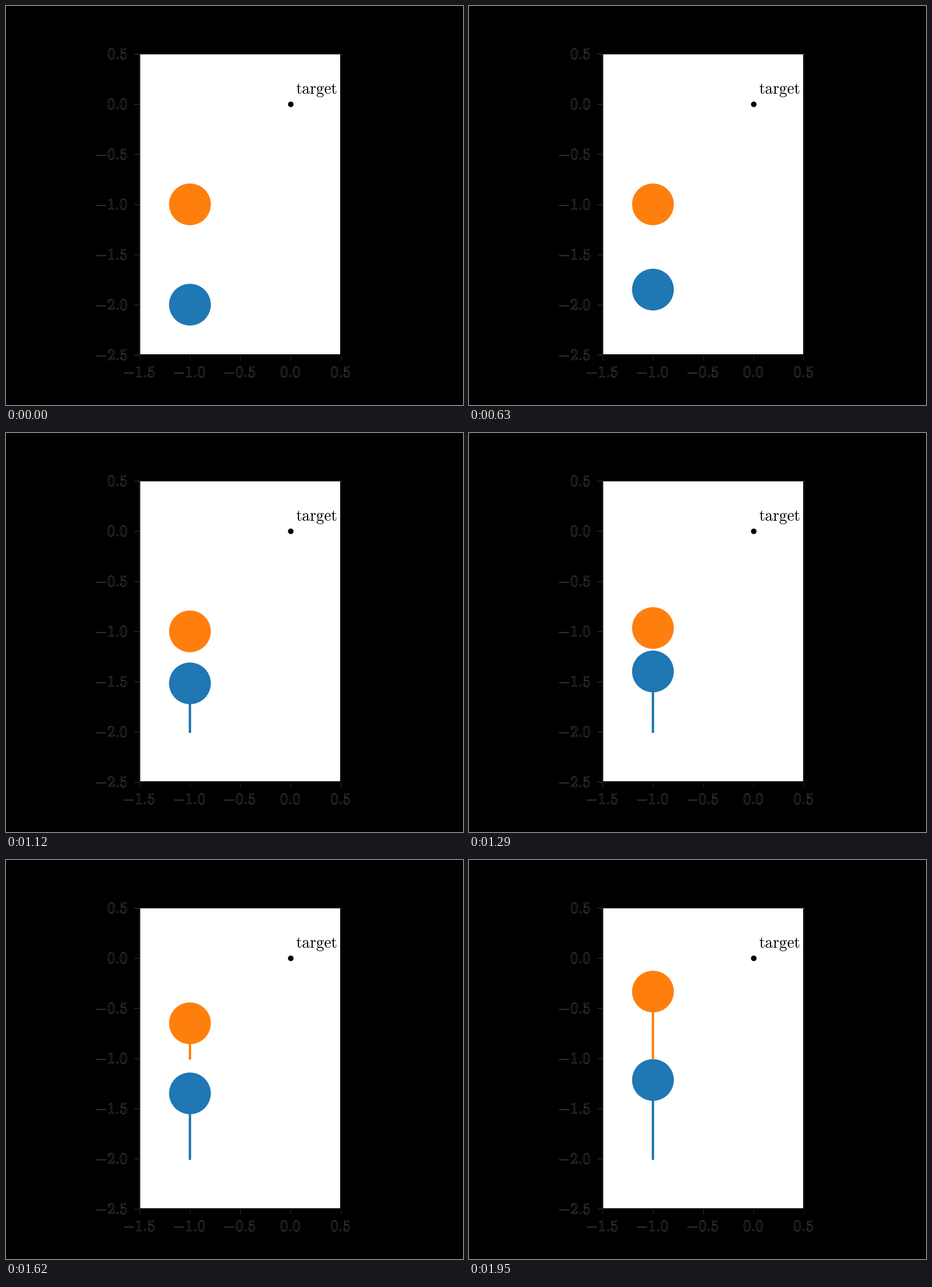
Write a matplotlib script that moves like this. It is 800 by 700 pixels and loops after 1990 ms.

```python
import math

import matplotlib.pyplot as plt
from matplotlib.animation import FuncAnimation
from matplotlib.patches import Circle
from matplotlib.patheffects import Stroke
from matplotlib.transforms import IdentityTransform

plt.rcParams["mathtext.fontset"] = "cm"

TICK_MS, LOOP_MS = 10, 1990
STEP_MS, STEPS = 33, 60
RADIUS = 0.2
ACCEL = 1 / 1200            # units per step squared
GAP = 1 - 2 * RADIUS        # free path before the balls touch
T_HIT = math.sqrt(2 * GAP / ACCEL)
V_HIT = ACCEL * T_HIT

fig = plt.figure(figsize=(8, 7), dpi=100, facecolor="black")
ax = fig.add_axes([234 / 800, 88 / 700, 352 / 800, 528 / 700])
ax.set(xlim=(-1.5, 0.5), ylim=(-2.5, 0.5), autoscale_on=False)
xticks = [-1.5, -1, -0.5, 0, 0.5]
yticks = [-2.5, -2] + xticks
ax.set_xticks(xticks, [""] * len(xticks))
ax.set_yticks(yticks, [""] * len(yticks))
ax.tick_params(length=7, width=0.72)
ax.tick_params(axis="x", color="#262626")
ax.tick_params(axis="y", color="#383838")
for spine in ax.spines.values():
    spine.set(linewidth=1.44, color="black")


def edge_line(xs, ys):
    """Faint one-pixel line along the frame, in figure pixels."""
    ax.plot(xs, ys, color="#383838", lw=0.72, transform=IdentityTransform(),
            clip_on=False, zorder=3)


edge_line([224, 587], [616, 616])
edge_line([233, 233], [88, 616])


def tick_label(value, at, offset, ha):
    """Black digits with a faint outline on the black surround."""
    note = ax.annotate(f"${value:.1f}$", at, xytext=offset,
                       textcoords="offset pixels", ha=ha, va="baseline",
                       fontsize=20, color="black", annotation_clip=False)
    note.set_path_effects([Stroke(linewidth=0.36, foreground="#606060")])


for v in xticks:
    tick_label(v, (v, -2.5), (-1 if v < 0 else 0, -39), "center")
for v in yticks:
    tick_label(v, (-1.5, v), (-20.5, -9), "right")

ax.plot([0], [0], "ko")
ax.text(0.05, 0.1, r"$\mathrm{target}$", fontsize=20)


class Ball:
    def __init__(self, x, y, color):
        self.x, self.y = x, y
        self.disc = ax.add_patch(Circle((x, y), RADIUS, color=color, lw=2))
        self.trail, = ax.plot([x, x], [y, y], color=color, lw=3)

    def move(self, dist):
        y = self.y + dist
        self.disc.center = self.x, y
        self.trail.set_data([self.x, self.x], [self.y, y])


pusher = Ball(-1, -2, "#1f77b4")
struck = Ball(-1, -1, "#ff7f0e")


def update(i):
    k = min((i * TICK_MS + 4) // STEP_MS, STEPS - 1)
    after = max(k - T_HIT, 0)
    # at the hit the pusher stops dead and hands over its speed
    pusher.move(ACCEL * (min(k, T_HIT) ** 2 + after ** 2) / 2)
    struck.move(V_HIT * after)
    return pusher.disc, pusher.trail, struck.disc, struck.trail


anim = FuncAnimation(fig, update, frames=LOOP_MS // TICK_MS,
                     interval=TICK_MS, repeat=True, repeat_delay=0)
plt.show()
```
